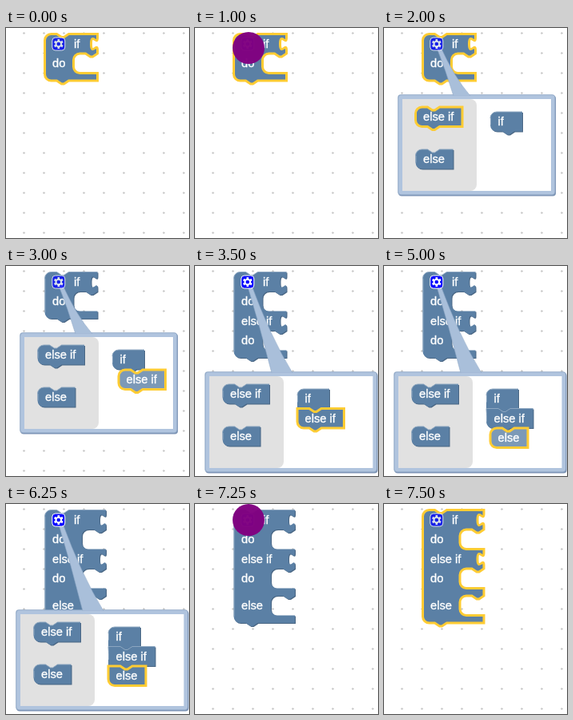
Write an HTML page that moves like this. It is 229x263 px and loops after 8500 ms.

```html
<!DOCTYPE html>
<html lang="en">
<head>
<meta charset="utf-8">
<title>Block mutator</title>
<style>
  html, body { margin: 0; width: 100%; height: 100%; overflow: hidden; background: #fff; }
  svg { display: block; width: 229px; height: 263px; }
  text { font: 14.67px "Liberation Sans", Arial, sans-serif; fill: #fff; stroke: #fff; stroke-width: .35px; }
  .body { fill: #5b80a5; }
  .shade { fill: #496684; }
  .light { fill: none; stroke: #8ca6c0; }
  .selected .body { stroke: #fc3; stroke-width: 3; }
  .selected .shade, .selected .light { display: none; }
  .dragging .body { fill: #7c99b7; }
</style>
</head>
<body>
<svg id="stage" viewBox="0 0 229 263"></svg>
<script>
const LOOP = 8500;
const ROW = 24.5;
const GAP = 9.5;
const NOTCH = 'H15l6,4h3l6,-4';
const TAB = 'H30l-6,4h-3l-6,-4';
const VALUE_SOCKET = 'v5c0,10 -8,-8 -8,7.5s8,-2.5 8,7.5';
const stage = document.getElementById('stage');

const group = (x, y, content, cls = '') =>
  `<g transform="translate(${x} ${y})" class="${cls}">${content}</g>`;
const label = (x, y, s) => `<text x="${x}" y="${y}">${s}</text>`;

function shape(path, light) {
  return `<path class="shade" transform="translate(1 1)" d="${path}"/>` +
    `<path class="body" d="${path}"/><path class="light" d="${light}"/>`;
}

const SMALL = {
  'if': { width: 40, notch: false, tab: true },
  'else if': { width: 58.5, notch: true, tab: true },
  'else': { width: 47, notch: true, tab: false }
};

// joined: which edges touch a neighbour and so have square corners
function smallBlock(name, x, y, cls = '', joined = '') {
  const { width, notch, tab } = SMALL[name];
  const start = joined.includes('top') ? 'M0,0' : 'M0,8A8,8 0 0 1 8,0';
  const end = joined.includes('bottom') ? 'H0' : 'H8a8,8 0 0 1 -8,-8';
  const top = start + (notch ? NOTCH : '') + `H${width}`;
  const path = top + `v${ROW}` + (tab ? TAB : '') + end + 'z';
  const light = `M.5,${ROW - 8}V8` + top.replace('M', 'L');
  return group(x, y, shape(path, light) + label(9.5, 17, name), cls);
}

// Each row is a label with either a value socket or a statement cavity.
const MAIN_ROWS = [
  ['if', 'do'],
  ['if', 'do', 'else if', 'do'],
  ['if', 'do', 'else if', 'do', 'else']
];

function mainBlock(stageIndex, selected) {
  const edge = stageIndex === 2 ? 46.5 : 36;
  const right = edge + 30;
  const top = `M0,8A8,8 0 0 1 8,0${NOTCH}H${right}`;
  let path = top, texts = '', y = 0;
  for (const name of MAIN_ROWS[stageIndex]) {
    if (name === 'else') { y += GAP; path += `V${y}`; }
    texts += label(name === 'if' ? 36.5 : 9.5, y + 17.3, name);
    path += name.endsWith('if')
      ? `${VALUE_SOCKET}V${y + ROW}`
      : `l-6,4h-3l-6,-4h-7a8,8 0 0 0 -8,8v${ROW - 16}a8,8 0 0 0 8,8H${right}`;
    y += ROW;
  }
  y += GAP;
  path += `V${y}${TAB}H8a8,8 0 0 1 -8,-8z`;
  const light = `M.5,${y - 8}V8` + top.replace('M', 'L');
  return group(48.5, 7.5, shape(path, light) + texts, selected ? 'selected' : '');
}

function gear(opacity) {
  let teeth = '';
  for (let a = 0; a < 360; a += 60)
    teeth += `<rect x="-1.3" y="-6" width="2.6" height="3" fill="#fff" transform="rotate(${a})"/>`;
  return `<g transform="translate(65.8 20)" opacity="${opacity}">` +
    '<rect x="-8" y="-8" width="16" height="16" rx="4" fill="#00f" stroke="#fff"/>' + teeth +
    '<circle r="3.3" fill="none" stroke="#fff" stroke-width="2"/></g>';
}

function bubble(x, y, width, height) {
  const low = y > 100;
  const tail = low
    ? 'M65,22Q82,78 96,134H122Q94,88 70,22z'
    : 'M65,22Q77,52 87,85H108Q88,62 70,22z';
  const box = (dx, dy, fill) =>
    `<rect x="${x + dx}" y="${y + dy}" width="${width}" height="${height}" rx="4" fill="${fill}"/>`;
  const innerW = width - 11, innerH = height - 11;
  return box(.6, 1, '#7890b2') + box(-.3, -.3, '#90a8c6') +
    `<rect x="${x + .7}" y="${y + .7}" width="${width - 1.6}" height="${height - 1.6}" rx="4" fill="#b0c4de"/>` +
    `<path d="${tail}" fill="#a9bfda" stroke="#91a9c8" stroke-width=".6"/>` +
    `<rect x="${x + 1.5}" y="${y + 1.3}" width="${width - 3}" height="4.5" fill="#b0c4de"/>` +
    group(x + 5.5, y + 5.5,
      `<rect width="${innerW}" height="${innerH}" fill="#fff"/>` +
      `<path d="M0,0H85a8,8 0 0 1 8,8V${innerH - 8}a8,8 0 0 1 -8,8H0z" fill="#e1e1e1"/>`);
}

function mutator(s) {
  const low = s.open === 'low';
  const dx = low ? -5 : 0, dy = low ? 49 : 0;
  const mark = name => (s.picked === name ? 'selected' : '');
  const place = (name, x, y, cls, joined) => smallBlock(name, x + dx, y + dy, cls, joined);
  let out = bubble(17.5 + dx, 83.5 + dy, low ? 215.5 : 197, 126);
  out += place('else if', 39.5, 99, mark('else if')) + place('else', 39.5, 152, mark('else'));
  out += place('if', 133, 105, '', low ? 'bottom' : '');
  if (low) {
    out += place('else if', 133, 129.5, s.active === 'else if' ? 'selected' : '',
      s.active === 'else' ? 'top bottom' : 'top');
    if (s.active === 'else') out += place('else', 133, 154, 'selected', 'top');
  }
  if (s.drag) out += smallBlock(...s.drag, 'selected dragging');
  return out;
}

const STEPS = [
  { at: 0, main: 0, selected: true },
  { at: 750, main: 0, selected: true, click: [70, 25] },
  { at: 1000, main: 0, selected: true, click: [67, 25] },
  { at: 1250, main: 0, selected: true, open: 'high' },
  { at: 2000, main: 0, selected: true, open: 'high', picked: 'else if' },
  { at: 2500, main: 0, open: 'high', drag: ['else if', 133, 148] },
  { at: 2750, main: 0, open: 'high', drag: ['else if', 147, 137] },
  { at: 3000, main: 0, open: 'high', drag: ['else if', 141, 130] },
  { at: 3250, main: 1, open: 'low', active: 'else if' },
  { at: 4000, main: 1, open: 'low', active: 'else if', picked: 'else' },
  { at: 4750, main: 1, open: 'low', drag: ['else', 66, 214] },
  { at: 5000, main: 1, open: 'low', drag: ['else', 133, 203] },
  { at: 5500, main: 2, open: 'low', active: 'else' },
  { at: 7250, main: 2, click: [67, 20] },
  { at: 7500, main: 2, selected: true }
];

function gridDots() {
  let d = '';
  for (let x = 22.5; x < 229; x += 25)
    for (let y = 6.5; y < 263; y += 25) d += `M${x - 1.5},${y}h3M${x},${y - 1.5}v3`;
  return `<path d="${d}" stroke="#ccc"/>`;
}

const grid = gridDots();

function draw(s) {
  let out = grid + mainBlock(s.main, s.selected);
  if (s.open) out += mutator(s);
  out += gear(s.open === 'low' ? 1 : .75);
  if (s.click)
    out += `<circle cx="${s.click[0]}" cy="${s.click[1]}" r="20" fill="#800080" opacity=".97"/>`;
  stage.innerHTML = out;
}

let current = null;
const began = performance.now();
function tick() {
  const t = (performance.now() - began) % LOOP;
  const step = STEPS.findLast(s => s.at <= t) || STEPS[0];
  if (step !== current) draw(current = step);
  requestAnimationFrame(tick);
}
tick();
</script>
</body>
</html>
```
